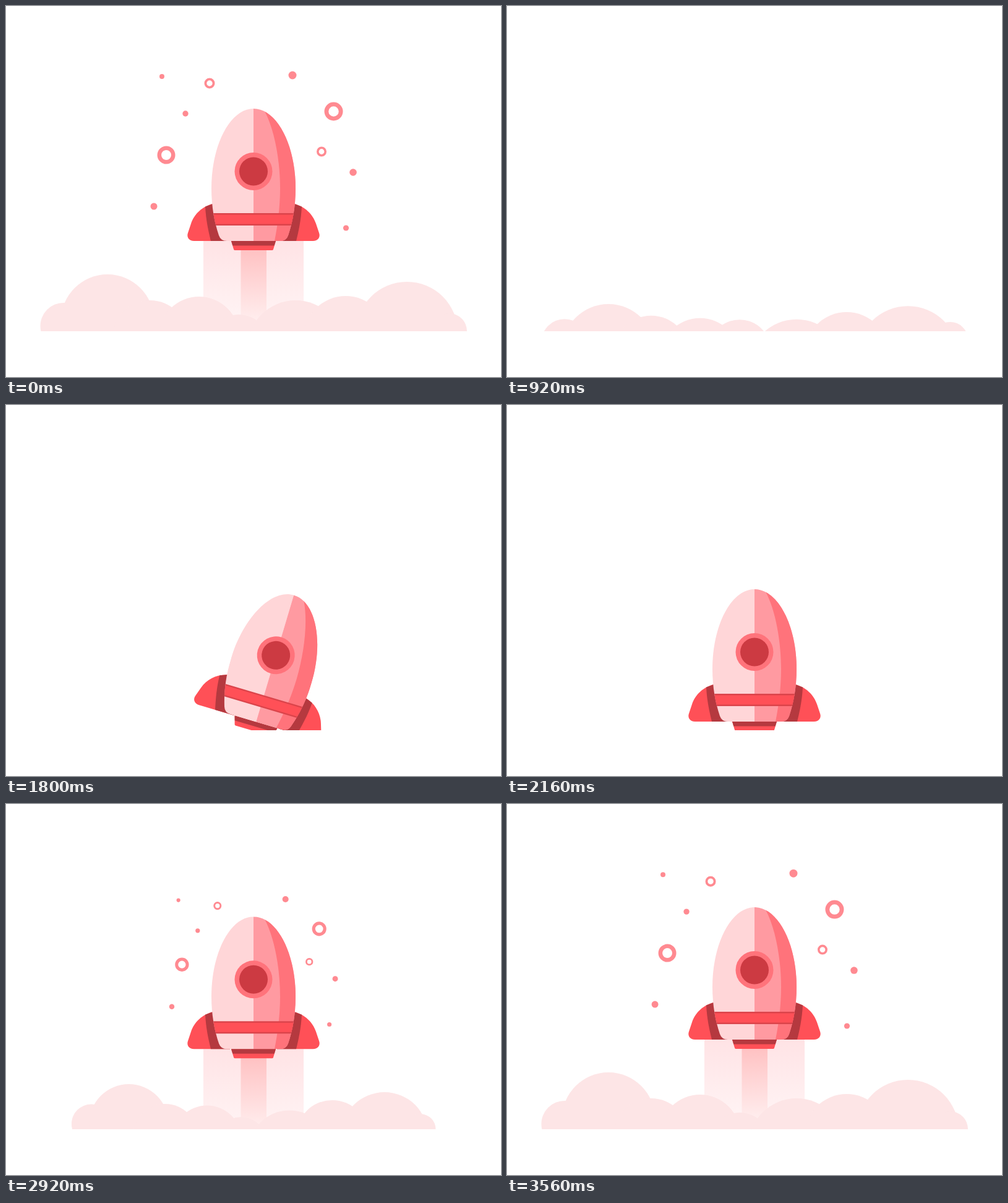
Animation, 800 px wide and 600 px high, one loop 3600 ms. Source, as an HTML page:

```html
<!DOCTYPE html>
<html lang="en">
<head>
<meta charset="utf-8">
<title>Rocket</title>
<style>
  html, body { margin: 0; width: 100%; height: 100%; overflow: hidden; background: #fff; }
  svg { display: block; width: 100vw; height: 100vh; }
</style>
</head>
<body>
<svg viewBox="0 0 800 600">
  <defs>
    <clipPath id="ground"><rect width="800" height="526"/></clipPath>
    <clipPath id="hull">
      <path d="M400 166C437.5 166 468 224 468 295C468 325 463 350 456 371Q453 380 443 380H357Q347 380 344 371C337 350 332 325 332 295C332 224 362.5 166 400 166Z"/>
    </clipPath>
    <linearGradient id="glow" x2="0" y2="1">
      <stop stop-color="#ffe3e5"/><stop offset="1" stop-color="#fff"/>
    </linearGradient>
    <linearGradient id="jet" x2="0" y2="1">
      <stop stop-color="#ffc0c1"/><stop offset="1" stop-color="#fff"/>
    </linearGradient>
    <g id="fin">
      <path fill="#ff5057" d="M334 320C317 324 304 337 299 352L294 367C291.500 374 296 380 304 380H362V320Z"/>
      <path fill="#b5393f" d="M322 324.5L334 320H362V380H331C327 364 323 345 322 324.5Z"/>
    </g>
  </defs>
  <g clip-path="url(#ground)">
    <g id="flame">
      <rect x="319" y="380" width="162" height="214" fill="url(#glow)"/>
      <rect x="379.5" y="390" width="41.5" height="164" fill="url(#jet)"/>
    </g>
    <g id="sparks"></g>
    <g id="rocket">
      <use href="#fin"/>
      <use href="#fin" transform="matrix(-1 0 0 1 800 0)"/>
      <path fill="#ff5057" d="M364 380H436L432 393.5Q431.500 395 430 395H370Q368.500 395 368 393.500Z"/>
      <path fill="#b5393f" d="M364 380H436L433.700 387.500H366.300Z"/>
      <g clip-path="url(#hull)">
        <rect x="330" y="160" width="70" height="222" fill="#ffd6d8"/>
        <rect x="400" y="160" width="70" height="222" fill="#ff9aa1"/>
        <path fill="#ff737b" d="M415 160L418 170C434 200 443 250 443 295C443 325 439 355 434 380H470V160Z"/>
        <rect x="330" y="335" width="140" height="20" fill="#db444b"/>
        <rect x="330" y="337.5" width="140" height="15" fill="#ff5057"/>
      </g>
      <circle cx="400" cy="267.5" r="30.5" fill="#ff737b"/>
      <circle cx="400" cy="267.5" r="23" fill="#cc3a42"/>
    </g>
    <g id="clouds" fill="#fde5e6"></g>
  </g>
</svg>
<script>
const LOOP = 3600, STEP = 40, GROUND = 526, MID = 400;

// Key points: x, y, radius
const clouds = [
  [93, 517.5, 37.5], [164, 509, 75], [233, 537, 61],
  [312, 535, 65], [376, 549, 50], [468, 554, 78],
  [549, 537, 68], [648, 528, 82], [716, 526, 29]
];
const sparks = [
  [252, 114, 4], [290, 174, 4.7], [463, 112, 6.5], [561, 269, 5.8], [549.5, 359, 4.6],
  [239, 324, 5.5], [329, 125, 8.5], [529.5, 170.5, 15], [510, 235.5, 8], [259, 241, 14.5]
];

const $ = id => document.getElementById(id);
const span = (t, from, to) => Math.min(1, Math.max(0, (t - from) / (to - from)));
const cubicIn = u => u ** 3;
const smooth = u => u * u * (3 - 2 * u);
const backOut = u => 1 + 2.70158 * (u - 1) ** 3 + 1.70158 * (u - 1) ** 2;

function set(el, attrs) {
  for (const name in attrs) el.setAttribute(name, attrs[name]);
}

function addCircles(id, points) {
  return points.map(() => $(id).appendChild(
    document.createElementNS("http://www.w3.org/2000/svg", "circle")));
}
const puffs = addCircles("clouds", clouds);
const dots = addCircles("sparks", sparks);

function drawRocket(t) {
  let y = 132, angle = 0, heat = 1;
  if (t < 1480) y = -380.5 * cubicIn(t / 440);
  else if (t < 2126) {
    angle = -180 * (1 - backOut(span(t, 1487, 2095)));
    heat = 0;
  } else {
    y = t < 2600 ? 132 - 108 * cubicIn(span(t, 2126, 2600)) : 24 * (1 - span(t, 2600, LOOP));
    heat = span(t, 2160, 2600);
  }
  const transform = `rotate(${angle} ${MID} 526.5) translate(0 ${y})`;
  set($("rocket"), { transform });
  set($("flame"), { transform, opacity: heat });
}

// Neighbouring puffs bob in opposite directions, most strongly in the middle.
function bob(i) {
  const side = i % 2 ? 1 : -1;
  return 8 - i + 13 * side * Math.sin(Math.PI * i / 8) ** 3;
}

function drawClouds(t) {
  clouds.forEach(([x, y, r], i) => {
    if (t < 1080) {
      const sink = span(t, 560, 1080) ** 2 * (GROUND - (y + bob(i) - r));
      set(puffs[i], { cx: x, cy: y + bob(i) * smooth(span(t, 0, 440)) + sink, r });
    } else {
      const left = (1 - span(t, 2524, 3562)) ** 4;
      set(puffs[i], { cx: x + (MID - x) * left, cy: y + (i % 2) * 55 * left, r: r * (1 - left) });
    }
  });
}

// Sparks ease outwards to their places, then burst a fixed distance further.
function drawSparks(t) {
  const burst = t < 800, u = t / 800;
  const k = burst ? (2 * u - u * u) / 0.7975 : ((LOOP - t) / 680) ** 2;
  set($("sparks"), { opacity: burst ? 1 - span(t, 0, 740) : span(t, 2600, 2760) });
  sparks.forEach(([x, y, r], i) => {
    const dx = x - MID, dy = y - 345, far = Math.hypot(dx, dy);
    const shift = burst ? 60 / far * k : -0.18 * k;
    const size = Math.max(0, r * (1 + (burst ? 0.3 : -0.23) * k));
    const ring = r > 7;
    set(dots[i], {
      cx: x + dx * shift,
      cy: y + dy * shift,
      r: ring ? size * 0.775 : size,
      fill: ring ? "none" : "#ff8a91",
      stroke: ring ? "#ff8a91" : "none",
      "stroke-width": size * 0.45
    });
  });
}

const start = performance.now();
function frame() {
  const t = Math.floor((performance.now() - start) % LOOP / STEP) * STEP;
  drawRocket(t);
  drawClouds(t);
  drawSparks(t);
  requestAnimationFrame(frame);
}
frame();
</script>
</body>
</html>
```
